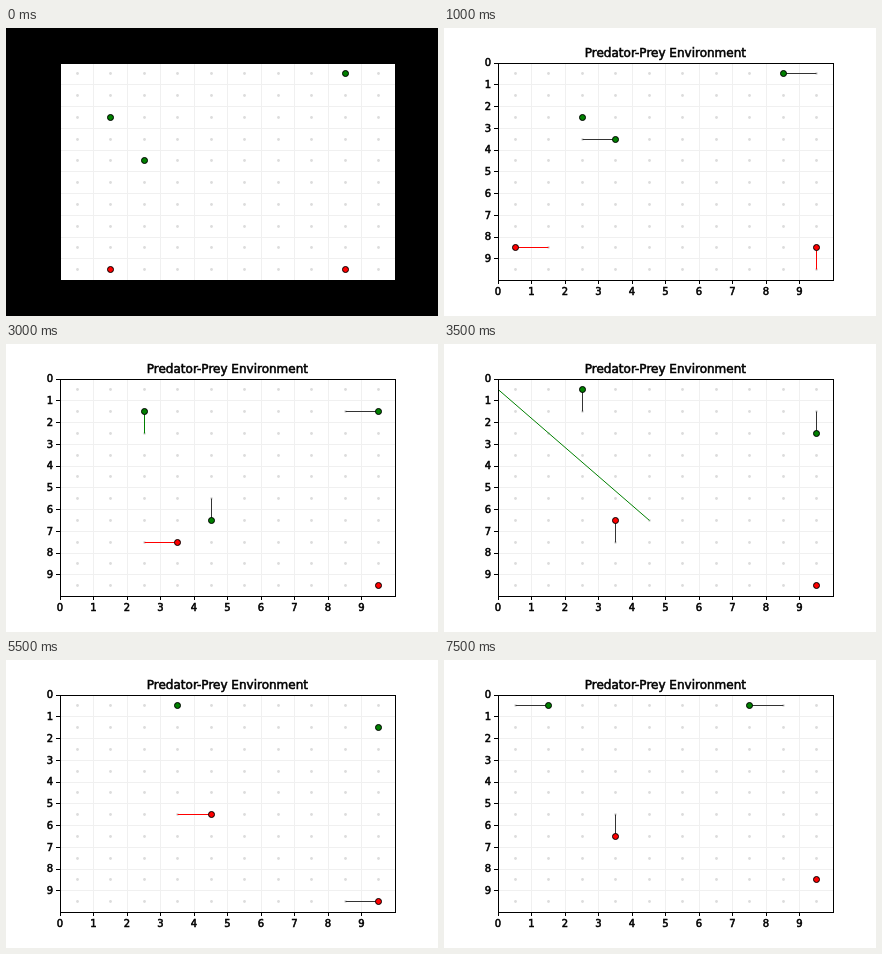
These frames come from a looping animation (432 by 288 pixels, 8000 ms). An HTML page:

```html
<!DOCTYPE html>
<html>
<head>
<meta charset="utf-8">
<style>
  html, body { margin: 0; width: 100%; height: 100%; overflow: hidden; background: #fff; }
  svg { display: block; }
  text { font-family: "DejaVu Sans", sans-serif; fill: #000; stroke: #000; stroke-width: .55px; }
</style>
</head>
<body>
<svg id="stage" width="432" height="288" viewBox="0 0 432 288">
  <defs><clipPath id="plot"><rect x="54" y="35" width="335" height="217"/></clipPath></defs>
</svg>
<script>
const STEP = 500, STEPS = 16, CELLS = 10;
const LEFT = 54, TOP = 34.56, CELL_W = 33.48, CELL_H = 21.744;
const DARK = '#333';
const stage = document.getElementById('stage');

// Grid coordinates to pixel centres.
const px = col => Math.round(LEFT + col * CELL_W) + .5;
const py = row => Math.round(TOP + row * CELL_H) + .5;

function add(parent, tag, attrs, text) {
  const el = document.createElementNS('http://www.w3.org/2000/svg', tag);
  for (const key in attrs) el.setAttribute(key, attrs[key]);
  if (text !== undefined) el.textContent = text;
  parent.appendChild(el);
  return el;
}

// One letter per step: direction, "." to stay, "x" to leave the board; capitals leave a dark trail.
const agents = [
  { color: '#008000', start: [1, 2], moves: 'R..duuU.R..LLLR' },
  { color: '#008000', start: [8, 0], moves: 'RLdduRD..U.U.LL' },
  { color: '#008000', start: [2, 4], moves: 'uRddRDx' },
  { color: '#ff0000', start: [1, 9], moves: 'ulrurrUUUDrrlLD' },
  { color: '#ff0000', start: [8, 9], moves: 'Ru..d...L.R..U.' }
];
const DIRS = { l: [-1, 0], r: [1, 0], u: [0, -1], d: [0, 1] };

function walk({ start, moves }) {
  const path = [start];
  for (const move of moves) {
    const [col, row] = path[path.length - 1];
    const [dx, dy] = DIRS[move.toLowerCase()] || [0, 0];
    path.push(move === 'x' ? [-2, -2] : [col + dx, row + dy]);
  }
  return path;
}

const grid = add(stage, 'g', {});
for (let i = 1; i < CELLS; i++) {
  add(grid, 'path', { d: `M${px(i)} 35V252M54 ${py(i)}H389`, stroke: '#f0f0f0' });
}
for (let col = 0; col < CELLS; col++) {
  for (let row = 0; row < CELLS; row++) {
    add(grid, 'circle', { cx: px(col + .5), cy: py(row + .5), r: 1.4, fill: '#dcdcdc' });
  }
}

const board = add(stage, 'g', { 'clip-path': 'url(#plot)' });
for (const agent of agents) {
  agent.path = walk(agent);
  agent.trail = add(board, 'line', { 'stroke-width': 1 });
}
for (const agent of agents) {
  agent.dot = add(board, 'circle', { r: 3, fill: agent.color, stroke: '#000' });
}

const axes = add(stage, 'g', {});
add(axes, 'rect', { x: 54.5, y: 35.5, width: 335, height: 217, fill: 'none', stroke: '#000' });
for (let i = 0; i < CELLS; i++) {
  add(axes, 'path', { d: `M${px(i)} 252v4M54 ${py(i)}h-4`, stroke: '#000' });
  add(axes, 'text', { x: LEFT + i * CELL_W, y: 266.8, 'font-size': 10, 'text-anchor': 'middle' }, i);
  add(axes, 'text', { x: 47, y: TOP + i * CELL_H + 3.8, 'font-size': 10, 'text-anchor': 'end' }, i);
}
add(axes, 'text', { x: 221.4, y: 28.6, 'font-size': 12, 'text-anchor': 'middle' }, 'Predator-Prey Environment');

// The opening step shows only the plot area on black.
const mask = add(stage, 'path', { d: 'M0 0H432V288H0ZM55 36V252H389V36Z', fill: '#000' });

function show(visible, el) {
  el.setAttribute('visibility', visible ? 'visible' : 'hidden');
}

function render(time) {
  const step = Math.floor(time / STEP) % STEPS;
  show(step === 0, mask);
  show(step > 0, axes);
  for (const { color, path, moves, trail, dot } of agents) {
    const at = i => path[Math.min(i, path.length - 1)];
    const [col, row] = at(step);
    const [fromCol, fromRow] = at(Math.max(step - 1, 0));
    const move = moves[step - 1] || '.';
    dot.setAttribute('cx', px(col + .5));
    dot.setAttribute('cy', py(row + .5));
    trail.setAttribute('x1', px(fromCol + .5));
    trail.setAttribute('y1', py(fromRow + .5));
    trail.setAttribute('x2', px(col + .5));
    trail.setAttribute('y2', py(row + .5));
    trail.setAttribute('stroke', /[A-Z]/.test(move) ? DARK : color);
    show(move !== '.', trail);
  }
}

const began = performance.now();
function tick() {
  render(performance.now() - began);
  requestAnimationFrame(tick);
}
tick();
</script>
</body>
</html>
```
